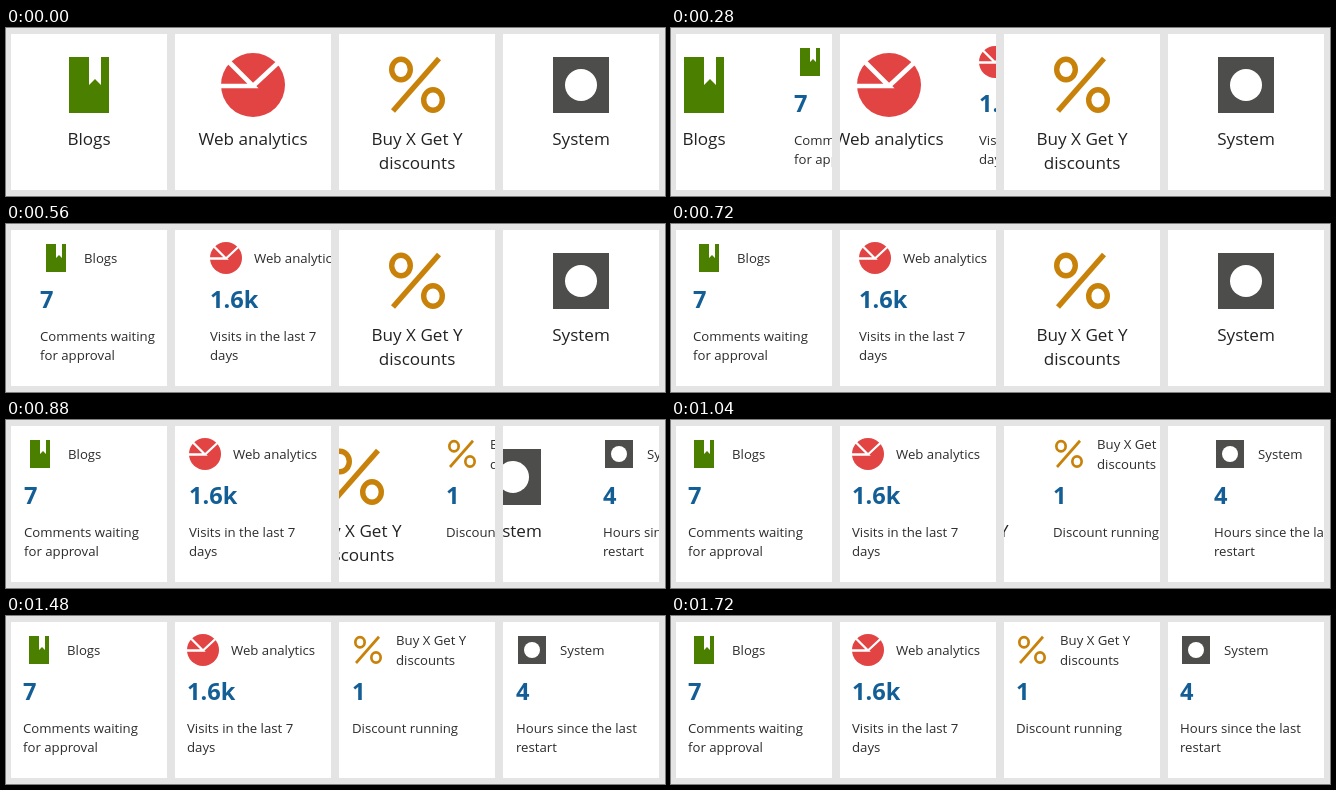
Animation of 659 by 168 pixels, one loop 7.4 s. Source, as an HTML page:

```html
<!DOCTYPE html>
<html lang="en">
<head>
<meta charset="utf-8">
<title>Live tiles</title>
<style>
html, body { margin: 0; width: 100%; height: 100%; overflow: hidden; background: #e4e4e4; }
#stage { display: block; font: 13.2px "Open Sans", "Noto Sans", sans-serif; fill: #2c2c2c; }
.name { font-size: 17.1px; text-anchor: middle; fill: #222; }
.count { font-size: 23.6px; font-weight: bold; fill: #135e95; }
</style>
</head>
<body>
<svg id="stage" width="659" height="168"></svg>
<script>
const SIZE = 156, LOOP = 7400;

// Icons are drawn in a 64 x 64 box.
const icons = {
  book: `<path fill="#4a7f00" d="M12 4h20v28l6-6 6 6V4h8v56H12z"/>`,
  pie: `<circle cx="32" cy="32" r="32" fill="#e24343"/>
    <path d="M-1 33H32L4 5M32 33L60 7" fill="none" stroke="#fff" stroke-width="4.6"/>`,
  percent: `<g fill="none" stroke="#c8820a" stroke-width="5.4">
    <path d="M8 58L54 5.5"/>
    <ellipse cx="16" cy="16.5" rx="9.3" ry="10.3"/>
    <ellipse cx="48" cy="47" rx="9.3" ry="10.3"/></g>`,
  system: `<path fill="#4d4d4c" d="M4 4h56v56H4z"/><circle cx="32" cy="32" r="16" fill="#fff"/>`
};

const tiles = [
  { icon: "book", name: ["Blogs"], count: "7",
    note: ["Comments waiting", "for approval"], start: 199, span: 1040 },
  { icon: "pie", name: ["Web analytics"], count: "1.6k",
    note: ["Visits in the last 7", "days"], start: 234, span: 1050 },
  { icon: "percent", name: ["Buy X Get Y", "discounts"], count: "1",
    note: ["Discount running"], start: 773, span: 1105 },
  { icon: "system", name: ["System"], count: "4",
    note: ["Hours since the last", "restart"], start: 755, span: 1130 }
];

const lines = (rows, x, y, step, cls = "") => rows.map((row, i) =>
  `<text class="${cls}" x="${x}" y="${y + i * step}">${row}</text>`).join("");

const drawTile = ({ icon, name, count, note }, i) => `
  <svg x="${5 + i * 164}" y="6" width="${SIZE}" height="${SIZE}">
    <rect width="${SIZE}" height="${SIZE}" fill="#fff"/>
    <g class="strip">
      <g transform="translate(46 19)">${icons[icon]}</g>
      ${lines(name, SIZE / 2, 111, 24, "name")}
      <g transform="translate(${SIZE})">
        <g transform="translate(12 12) scale(.5)">${icons[icon]}</g>
        ${lines(name, 56, name.length > 1 ? 23 : 33, 20)}
        ${lines([count], 12, 78, 0, "count")}
        ${lines(note, 12, 111, 19)}
      </g>
    </g>
  </svg>`;

const stage = document.getElementById("stage");
stage.innerHTML = tiles.map(drawTile).join("");
const strips = stage.querySelectorAll(".strip");

// cubic-bezier(.23, 1, .32, 1), solved by bisection
function easeOut(x) {
  if (x <= 0) return 0;
  if (x >= 1) return 1;
  let lo = 0, hi = 1;
  for (let i = 0; i < 24; i++) {
    const s = (lo + hi) / 2, r = 1 - s;
    if (.69 * s * r * r + .96 * s * s * r + s * s * s < x) lo = s;
    else hi = s;
  }
  return 1 - (1 - lo) ** 3;
}

function draw(now) {
  const time = Math.max(0, now - begin) % LOOP;
  tiles.forEach(({ start, span }, i) => {
    const shift = Math.round(SIZE * easeOut((time - start) / span));
    strips[i].setAttribute("transform", `translate(${-shift})`);
  });
  requestAnimationFrame(draw);
}

const begin = performance.now();
draw(begin);
</script>
</body>
</html>
```
